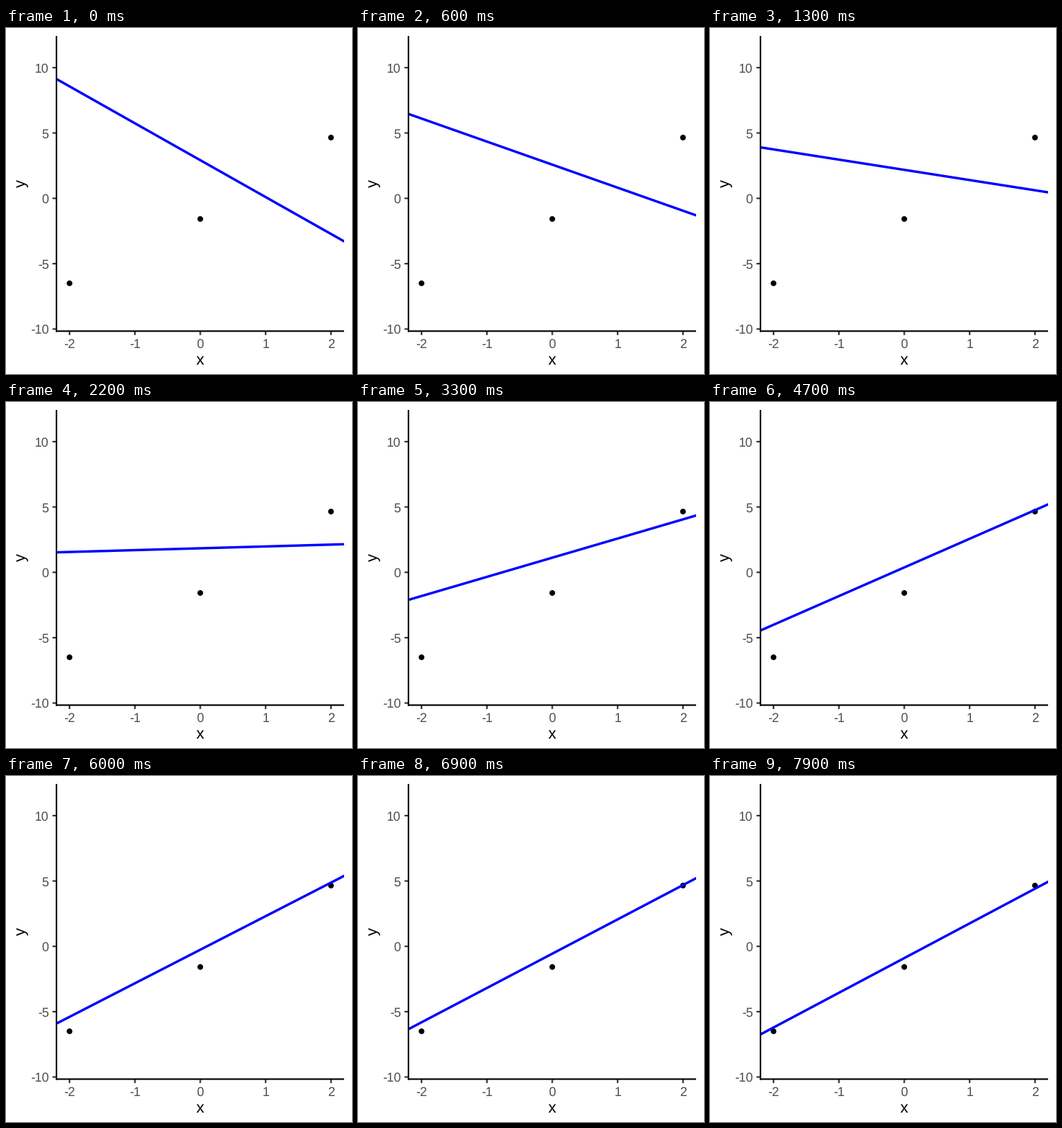
Animation, 480 px wide and 480 px high, one loop 8 s. Source, as a matplotlib script:

```python
import numpy as np
import matplotlib.pyplot as plt
from matplotlib.animation import FuncAnimation
from matplotlib.patches import Circle, Rectangle

SIZE, DPI = 480, 80
PX = 72 / DPI  # points per pixel
FRAMES, INTERVAL = 80, 100

LEFT, RIGHT, TOP, BOTTOM = 70, 469, 11, 420.5
POINTS = [(-2, -6.5), (0, -1.58), (2, 4.65)]

# Key poses of the fitted line; the slope closes in on BEST_SLOPE
STEPS = [0, 13, 22, 33, 47, 60, 79]
INTERCEPTS = [2.92, 2.18, 1.84, 1.12, 0.375, -0.26, -0.90]
SLOPES = np.array([-2.823, -0.782, 0.141, 1.467, 2.193, 2.568, 2.655])
BEST_SLOPE = 2.68

plt.rcParams["text.hinting"] = "none"


def sx(x):
    return 269.5 + 90.68 * x


def sy(y):
    return 236.3 - 18.13 * y


def fit(i):
    """Intercept falls steadily, the slope's error decays exponentially."""
    a = np.interp(i, STEPS, INTERCEPTS)
    b = BEST_SLOPE - np.exp(np.interp(i, STEPS, np.log(BEST_SLOPE - SLOPES)))
    return a, b


fig = plt.figure(figsize=(SIZE / DPI, SIZE / DPI), dpi=DPI, facecolor="white")
ax = fig.add_axes([0, 0, 1, 1])
ax.set_xlim(0, SIZE)
ax.set_ylim(SIZE, 0)
ax.axis("off")


def stroke(xs, ys, color, width, z):
    line, = ax.plot(xs, ys, color=color, lw=width * PX, zorder=z,
                    solid_capstyle="butt", snap=False)
    return line


def label(x, y, text, size, color, **kw):
    ax.text(x, y, text, fontsize=size * PX, color=color, va="baseline",
            family="Liberation Sans", **kw)


for v in range(-2, 3):
    stroke([sx(v)] * 2, [BOTTOM, BOTTOM + 5.5], "#333333", 2.13, 4)
    label(sx(v), 443.6, str(v), 17.6, "#4d4d4d", ha="center")
for v in range(-10, 11, 5):
    stroke([LEFT - 5.5, LEFT], [sy(v)] * 2, "#333333", 2.13, 4)
    label(59.5, sy(v) + 6.7, str(v), 17.6, "#4d4d4d", ha="right")

stroke([LEFT, LEFT], [TOP, BOTTOM + 1], "black", 2.13, 5)
stroke([LEFT - 1, RIGHT], [BOTTOM, BOTTOM], "black", 2.13, 5)
label(269.5, 467, "x", 22, "black", ha="center")
label(27.6, 215.5, "y", 22, "black", ha="center", rotation=90,
      rotation_mode="anchor")

for x, y in POINTS:
    ax.add_patch(Circle((sx(x), sy(y)), 3.95, fc="black", ec="none", zorder=2))

panel = Rectangle((LEFT, TOP), RIGHT - LEFT, BOTTOM - TOP,
                  transform=ax.transData)
model = stroke([], [], "blue", 3.4, 3)
model.set_clip_path(panel)
ENDS = np.array([-2.4, 2.4])


def draw(i):
    a, b = fit(i)
    model.set_data(sx(ENDS), sy(a + b * ENDS))
    return model,


anim = FuncAnimation(fig, draw, frames=FRAMES, interval=INTERVAL,
                     repeat=True, repeat_delay=0)
plt.show()
```
